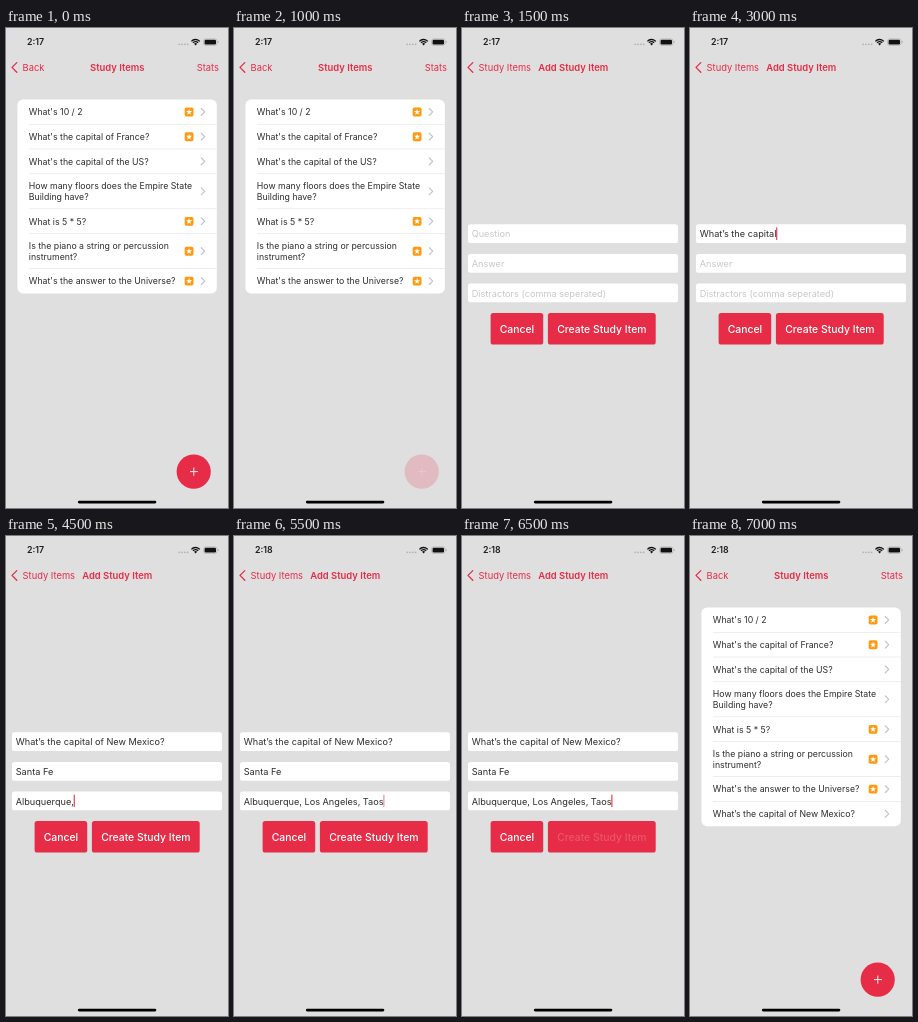
These frames come from a looping animation (222 by 480 pixels, 8 s). An HTML page with a canvas:

```html
<!DOCTYPE html>
<html lang="en">
<head>
<meta charset="utf-8">
<title>Study Items</title>
<style>
html, body { margin: 0; width: 100%; height: 100%; overflow: hidden; background: #dfdfdf; }
canvas { display: block; width: 222px; height: 480px; }
</style>
</head>
<body>
<canvas id="stage"></canvas>
<script>
const W = 222, H = 480, LOOP = 8000;
const RED = '#e62c46', BG = '#dfdfdf', INK = '#2c2c2e', HINT = '#c8c8ca', ORANGE = '#ff990f';

const canvas = document.getElementById('stage');
const ctx = canvas.getContext('2d');
const dpr = window.devicePixelRatio || 1;
canvas.width = W * dpr;
canvas.height = H * dpr;

// size, weight
const NAV = [9.35, 400];
const TITLE = [9.45, 600];
const ROW = [8.76, 400];
const FIELD = [9.16, 400];
const BUTTON = [10.4, 500];
const CLOCK = [8.8, 600];

const NEW_QUESTION = 'What’s the capital of New Mexico?';
const ITEMS = [
  { lines: ["What's 10 / 2"], star: true },
  { lines: ["What's the capital of France?"], star: true },
  { lines: ["What's the capital of the US?"] },
  { lines: ['How many floors does the Empire State', 'Building have?'] },
  { lines: ['What is 5 * 5?'], star: true },
  { lines: ['Is the piano a string or percussion', 'instrument?'], star: true },
  { lines: ["What's the answer to the Universe?"], star: true }
];
const NEW_ITEM = { lines: [NEW_QUESTION] };

const FIELDS = [
  { y: 196.2, hint: 'Question', steps: [[2500, 'What’s'], [3000, 'What’s the capital'], [3500, NEW_QUESTION]] },
  { y: 225.9, hint: 'Answer', steps: [[4000, 'Santa Fe']] },
  { y: 255.4, hint: 'Distractors (comma seperated)', steps: [
    [4500, 'Albuquerque,'], [5000, 'Albuquerque, Los Angeles,'], [5500, 'Albuquerque, Los Angeles, Taos']] }
];

function text(str, x, y, [size, weight], color, align = 'left') {
  ctx.font = `${weight} ${size}px Inter, sans-serif`;
  ctx.fillStyle = color;
  ctx.textAlign = align;
  ctx.fillText(str, x, y);
}

function box(x, y, w, h, r, color) {
  ctx.fillStyle = color;
  ctx.beginPath();
  ctx.roundRect(x, y, w, h, r);
  ctx.fill();
}

function line(points, color, width) {
  ctx.strokeStyle = color;
  ctx.lineWidth = width;
  ctx.lineCap = ctx.lineJoin = 'round';
  ctx.beginPath();
  points.forEach(([x, y]) => ctx.lineTo(x, y));
  ctx.stroke();
}

function disc(x, y, r, color) {
  ctx.fillStyle = color;
  ctx.beginPath();
  ctx.arc(x, y, r, 0, Math.PI * 2);
  ctx.fill();
}

function statusBar(t) {
  text(t < 5000 ? '2:17' : '2:18', 21, 17.4, CLOCK, '#1c1c1c');
  for (let i = 0; i < 4; i++) disc(173.2 + i * 2.8, 16.3, 0.9, '#b2b2b2');

  ctx.strokeStyle = '#111';
  ctx.lineCap = 'butt';
  ctx.lineWidth = 1.3;
  for (const r of [5.6, 3.5]) {
    ctx.beginPath();
    ctx.arc(189.6, 17.1, r, -Math.PI * 0.77, -Math.PI * 0.23);
    ctx.stroke();
  }
  ctx.fillStyle = '#111';
  ctx.beginPath();
  ctx.moveTo(189.6, 17.4);
  ctx.arc(189.6, 17.1, 2, -Math.PI * 0.77, -Math.PI * 0.23);
  ctx.fill();

  ctx.strokeStyle = '#a6a6a6';
  ctx.lineWidth = 0.6;
  ctx.beginPath();
  ctx.roundRect(197.6, 10.9, 13.4, 6.5, 2);
  ctx.stroke();
  box(198.6, 11.8, 11.4, 4.7, 1.2, '#111');
  box(211.7, 13.1, 0.8, 2.1, 0.4, '#a6a6a6');
}

function backLink(label) {
  line([[10.8, 34.6], [6, 39.4], [10.8, 44.2]], RED, 1.3);
  text(label, 16.6, 42.8, NAV, RED);
}

function star(x, y) {
  box(x - 4.4, y - 4.4, 8.8, 8.8, 1.7, ORANGE);
  ctx.fillStyle = '#fff';
  ctx.beginPath();
  for (let i = 0; i < 10; i++) {
    const r = i % 2 ? 1.3 : 3.2;
    const a = i * Math.PI / 5 - Math.PI / 2;
    ctx.lineTo(x + r * Math.cos(a), y + 0.1 + r * Math.sin(a));
  }
  ctx.fill();
}

function listScreen(items, pressed) {
  backLink('Back');
  text('Study Items', 111.2, 42.8, TITLE, RED, 'center');
  text('Stats', 213, 42.8, NAV, RED, 'right');

  const rowHeight = item => item.lines.length > 1 ? 35.1 : 24.75;
  const total = items.reduce((sum, item) => sum + rowHeight(item), 0);
  box(11.4, 71.5, 199.4, total, 5.6, '#fff');

  let y = 71.5;
  items.forEach((item, i) => {
    const h = rowHeight(item), mid = y + h / 2;
    if (i) {
      ctx.fillStyle = '#e2e2e4';
      ctx.fillRect(23, y - 0.3, 187.8, 0.6);
    }
    const first = mid + 3.4 - (item.lines.length - 1) * 5.7;
    item.lines.forEach((str, n) => text(str, 22.8, first + n * 11.4, ROW, INK));
    if (item.star) star(183.1, mid + 0.1);
    line([[195.3, mid - 3.4], [198.7, mid], [195.3, mid + 3.4]], '#c4c4c7', 1.2);
    y += h;
  });

  ctx.globalAlpha = pressed ? 0.2 : 1;
  disc(187.7, 443.6, 17.1, RED);
  line([[184, 443.6], [191.6, 443.6]], '#fff', 0.9);
  line([[187.8, 439.8], [187.8, 447.4]], '#fff', 0.9);
  ctx.globalAlpha = 1;
}

function caretAlpha(t) {
  if (t >= 4000 && t < 4500) return 0.35;
  return t >= 5500 && t < 6500 ? 0.6 : 1;
}

function formScreen(t) {
  backLink('Study Items');
  text('Add Study Item', 76.2, 42.8, TITLE, RED);

  const active = FIELDS.filter(f => t >= f.steps[0][0]).pop();
  for (const field of FIELDS) {
    box(6, field.y, 210, 18.9, 2.6, '#fff');
    const step = field.steps.filter(s => t >= s[0]).pop();
    const value = step ? step[1] : field.hint;
    text(value, 9.7, field.y + 13.1, FIELD, step ? INK : HINT);
    if (field === active) {
      ctx.globalAlpha = caretAlpha(t);
      box(9.7 + ctx.measureText(value).width - 0.2, field.y + 3.1, 1.1, 12.6, 0.5, RED);
      ctx.globalAlpha = 1;
    }
  }

  const dim = t >= 6500 ? 'rgba(255,255,255,0.2)' : '#fff';
  box(28.6, 284.9, 52.6, 31.6, 2.6, RED);
  text('Cancel', 54.9, 304.7, BUTTON, '#fff', 'center');
  box(85.9, 284.9, 107.8, 31.6, 2.6, RED);
  text('Create Study Item', 139.8, 304.7, BUTTON, dim, 'center');
}

function draw(t) {
  ctx.setTransform(dpr, 0, 0, dpr, 0, 0);
  ctx.fillStyle = BG;
  ctx.fillRect(0, 0, W, H);
  statusBar(t);
  if (t < 1500) listScreen(ITEMS, t >= 1000);
  else if (t < 7000) formScreen(t);
  else listScreen([...ITEMS, NEW_ITEM], false);
  box(71.9, 472.8, 78.4, 2.6, 1.3, '#000');
}

const start = performance.now();
function tick() {
  draw((performance.now() - start) % LOOP);
  requestAnimationFrame(tick);
}
tick();
</script>
</body>
</html>
```
